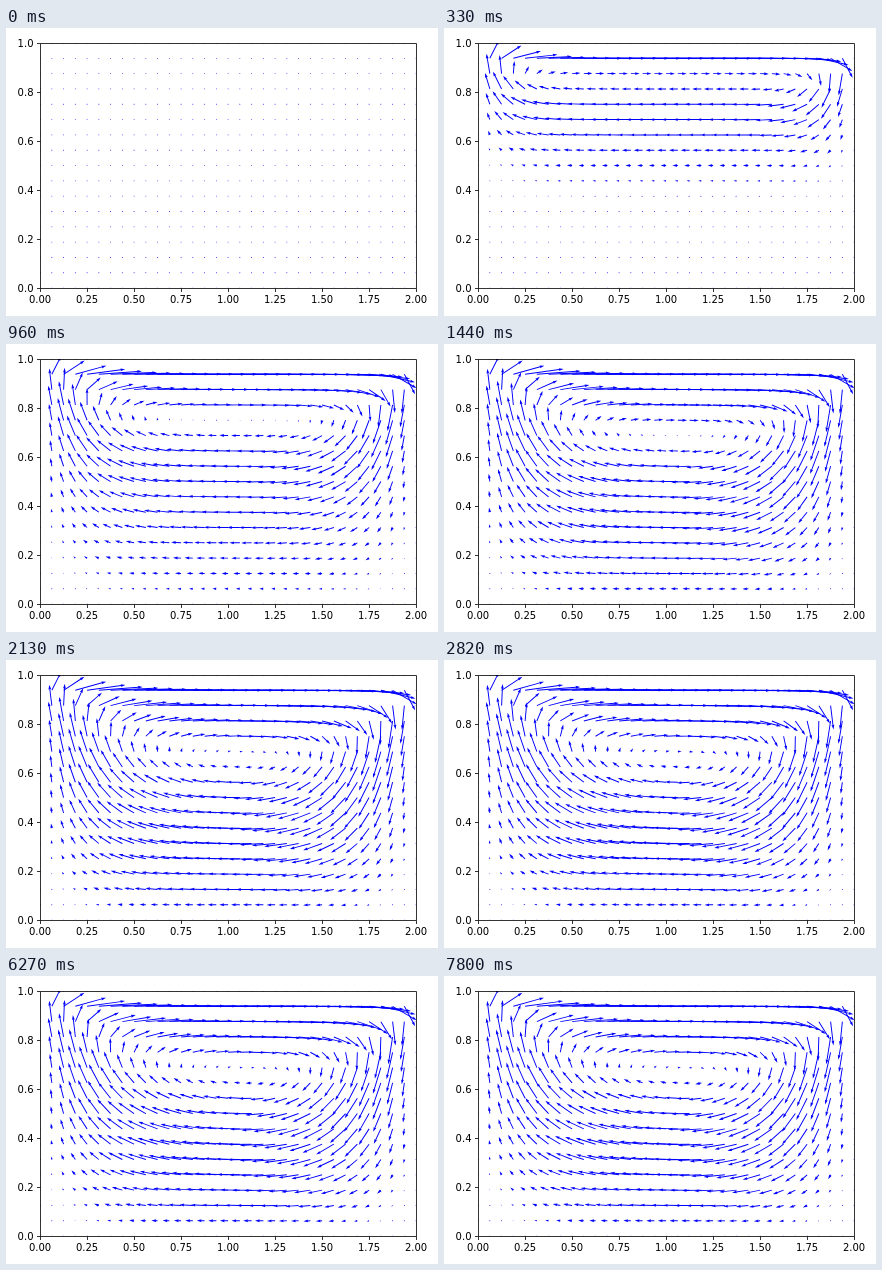
Recreate the animation shown at these times as an HTML page with a canvas. Size 432 by 288 pixels, loop 8000 ms.

```html
<!DOCTYPE html>
<html lang="en">
<head>
<meta charset="utf-8">
<title>Lid-driven cavity flow</title>
<style>
  html, body { margin: 0; width: 432px; height: 288px; overflow: hidden; background: #fff; }
  canvas { display: block; }
</style>
</head>
<body>
<canvas id="stage" width="432" height="288"></canvas>
<script>
const ctx = document.getElementById('stage').getContext('2d');
const LOOP = 8000, FRAME = 30, LAST = Math.floor(LOOP / FRAME) - 1;
const left = 34.1, right = 410.1, top_ = 15, bottom = 260.1;
const snap = v => Math.floor(v) + 0.5;

// Flow: streamfunction and vorticity on a 2 x 1 box, lid moving right
const NX = 33, NY = 17, h = 1 / 16, visc = 0.1, dt = 0.005, STEPS_PER_FRAME = 2;
const at = (i, j) => i * NY + j;
let psi, vort, steps, shown = -1;

function reset() {
  psi = new Float64Array(NX * NY);
  vort = new Float64Array(NX * NY);
  steps = 0;
}

function eachInner(fn) {
  for (let i = 1; i < NX - 1; i++)
    for (let j = 1; j < NY - 1; j++) fn(at(i, j));
}

function step() {
  // One Gauss-Seidel sweep of the Poisson equation
  eachInner(k => {
    psi[k] = 0.25 * (psi[k + NY] + psi[k - NY] + psi[k + 1] + psi[k - 1] + h * h * vort[k]);
  });

  // Wall vorticity
  const wall = k => -2 * psi[k] / (h * h);
  for (let i = 1; i < NX - 1; i++) {
    vort[at(i, 0)] = wall(at(i, 1));
    vort[at(i, NY - 1)] = wall(at(i, NY - 2)) - 2 / h;
  }
  for (let j = 1; j < NY - 1; j++) {
    vort[at(0, j)] = wall(at(1, j));
    vort[at(NX - 1, j)] = wall(at(NX - 2, j));
  }

  // Advection and diffusion
  const next = vort.slice();
  eachInner(k => {
    const e = vort[k + NY], w = vort[k - NY], n = vort[k + 1], s = vort[k - 1];
    const advect = (psi[k + 1] - psi[k - 1]) * (e - w) - (psi[k + NY] - psi[k - NY]) * (n - s);
    const diffuse = e + w + n + s - 4 * vort[k];
    next[k] += dt / (h * h) * (visc * diffuse - 0.25 * advect);
  });
  vort = next;
  steps++;
}

const shaft = 0.953, speedScale = (right - left) / 5;

// Adds an arrow to the path; u, v in pixels, y down
function arrow(x, y, u, v) {
  const size = Math.hypot(u, v) / shaft;
  if (size < 1) {
    ctx.moveTo(x + shaft / 2, y);
    for (let a = 1; a < 6; a++)
      ctx.lineTo(x + shaft / 2 * Math.cos(a * Math.PI / 3), y + shaft / 2 * Math.sin(a * Math.PI / 3));
    ctx.closePath();
    return;
  }
  const len = Math.max(size, 5), unit = shaft * Math.min(1, size / 5);
  const angle = Math.atan2(v, u), c = Math.cos(angle) * unit, s = Math.sin(angle) * unit;
  const outline = [[0, 0.5], [len - 4.5, 0.5], [len - 5, 1.5], [len, 0],
    [len - 5, -1.5], [len - 4.5, -0.5], [0, -0.5]];
  outline.forEach(([p, q], k) =>
    ctx[k ? 'lineTo' : 'moveTo'](x + p * c - q * s, y + p * s + q * c));
  ctx.closePath();
}

function drawField() {
  ctx.save();
  ctx.beginPath();
  ctx.rect(left, top_, right - left, bottom - top_);
  ctx.clip();
  ctx.fillStyle = '#00f';
  for (let i = 0; i < NX; i++) {
    for (let j = 0; j < NY; j++) {
      const k = at(i, j);
      const inner = i > 0 && j > 0 && i < NX - 1 && j < NY - 1;
      const u = inner ? (psi[k + 1] - psi[k - 1]) / (2 * h) : 0;
      const v = inner ? (psi[k - NY] - psi[k + NY]) / (2 * h) : 0;
      ctx.beginPath();
      arrow(left + (right - left) * i / (NX - 1), bottom - (bottom - top_) * j / (NY - 1),
        u * speedScale, -v * speedScale);
      ctx.fill();
    }
  }
  ctx.restore();
}

function drawAxes() {
  const x0 = snap(left), y0 = snap(bottom);
  ctx.strokeStyle = ctx.fillStyle = '#000';
  ctx.lineWidth = 0.8;
  ctx.font = '10px "DejaVu Sans", sans-serif';
  ctx.beginPath();
  ctx.rect(x0, snap(top_), snap(right) - x0, y0 - snap(top_));
  ctx.textAlign = 'center';
  for (let n = 0; n <= 8; n++) {
    const x = left + (right - left) * n / 8;
    ctx.moveTo(snap(x), y0);
    ctx.lineTo(snap(x), y0 + 3.5);
    ctx.fillText((n / 4).toFixed(2), x, 275);
  }
  ctx.textAlign = 'right';
  for (let n = 0; n <= 5; n++) {
    const y = bottom - (bottom - top_) * n / 5;
    ctx.moveTo(x0, snap(y));
    ctx.lineTo(x0 - 3.5, snap(y));
    ctx.fillText((n / 5).toFixed(1), 27.5, Math.round(y + 3.8));
  }
  ctx.stroke();
}

function render() {
  const frame = Math.min(LAST, Math.floor(performance.now() % LOOP / FRAME));
  if (frame !== shown) {
    const goal = STEPS_PER_FRAME * frame + 1;
    if (goal < steps) reset();
    while (steps < goal) step();
    ctx.fillStyle = '#fff';
    ctx.fillRect(0, 0, 432, 288);
    drawField();
    drawAxes();
    shown = frame;
  }
  requestAnimationFrame(render);
}

reset();
render();
</script>
</body>
</html>
```
